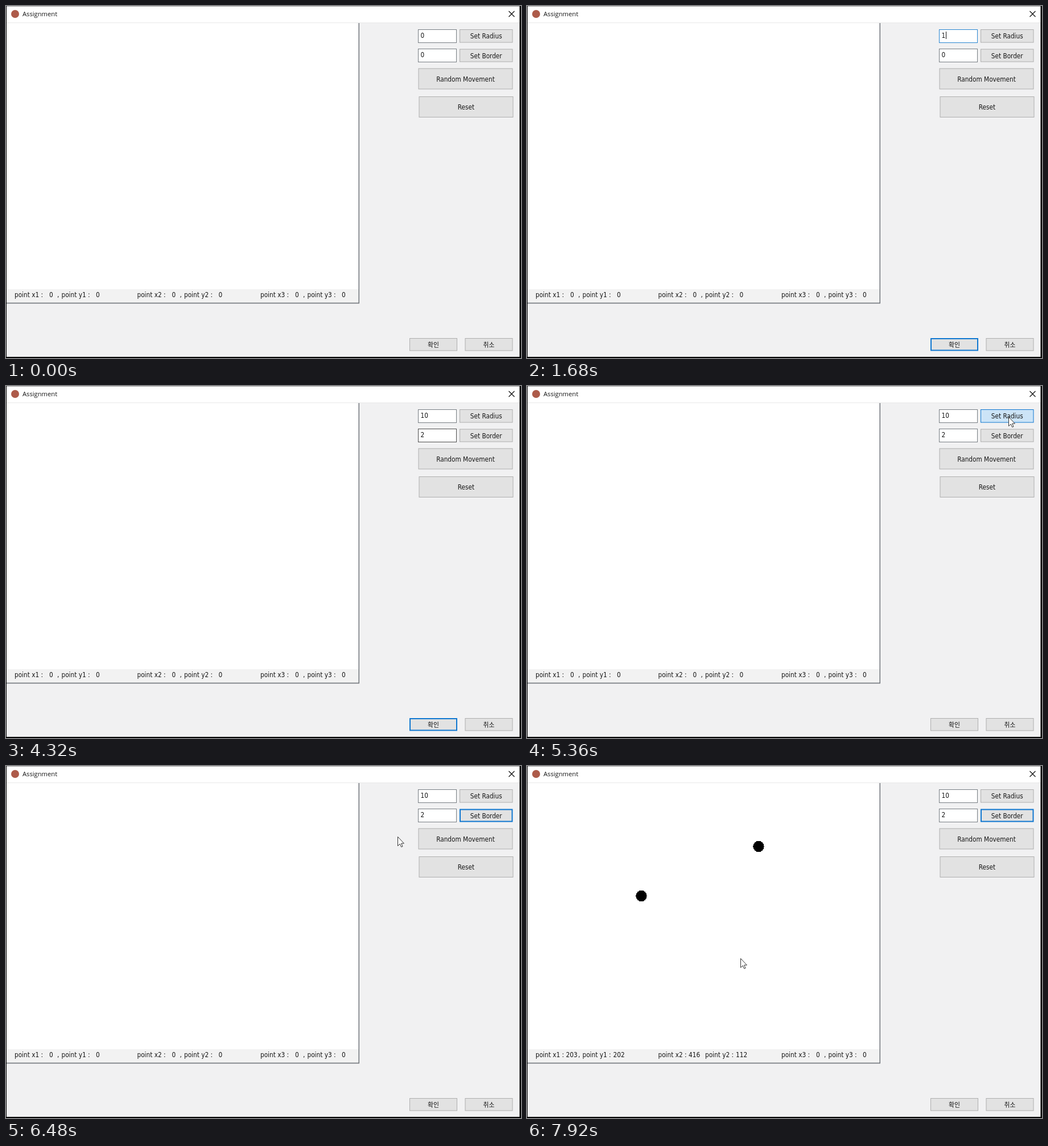
An HTML page that plays this animation: 905x619 px, repeating every 8 s.

```html
<!DOCTYPE html>
<html lang="ko">
<head>
<meta charset="utf-8">
<title>Assignment</title>
<style>
html, body { margin: 0; width: 100%; height: 100%; overflow: hidden; background: #f1f1f2; }
svg { display: block; width: 905px; height: 619px; }
text { font: 11.7px "DejaVu Sans Condensed", Roboto, sans-serif; fill: #161616; white-space: pre; }
.title { font: 11.2px "Open Sans", "Noto Sans", sans-serif; }
.korean { font: 10.8px "Noto Sans CJK KR", "Noto Sans CJK", sans-serif; }
.mid { text-anchor: middle; }
</style>
</head>
<body>
<svg id="stage" viewBox="0 0 905 619" xmlns="http://www.w3.org/2000/svg"></svg>
<script>
const LOOP = 8000, STEP = 80;
const stage = document.getElementById('stage');

function add(tag, attrs, text) {
  const el = document.createElementNS('http://www.w3.org/2000/svg', tag);
  set(el, attrs);
  if (text !== undefined) el.textContent = text;
  return stage.appendChild(el);
}
function set(el, attrs) {
  for (const key in attrs) el.setAttribute(key, attrs[key]);
}
const show = (el, on) => el.setAttribute('visibility', on ? 'visible' : 'hidden');
const rect = (x, y, width, height, fill) => add('rect', { x, y, width, height, fill });
const label = (x, y, text, cls = '') => add('text', { x, y, class: cls }, text);

function button(x, y, w, h, text, cls = '') {
  const box = add('rect', {});
  label(x + w / 2, y + h / 2 + 4.5, text, 'mid ' + cls);
  return state => {
    const inset = state === 'focus' ? 1 : 0.5;
    set(box, {
      x: x + inset, y: y + inset, width: w - 2 * inset, height: h - 2 * inset,
      fill: { hover: '#e5f1fb', pressed: '#cce4f7' }[state] || '#e2e2e2',
      stroke: state ? '#0f77d0' : '#aeaeae',
      'stroke-width': state === 'focus' ? 2 : 1
    });
  };
}

function field(y) {
  const box = add('rect', { x: 724.5, y: y + 0.5, width: 67, height: 23, fill: '#fff' });
  const mark = rect(728, y + 4, 8, 14, '#0078d7');
  const text = label(728.5, y + 15, '0');
  const caret = rect(0, y + 4, 1, 13, '#111');
  return (value, border, selected, blink) => {
    box.setAttribute('stroke', border);
    text.textContent = value;
    text.style.fill = selected ? '#fff' : '';
    show(mark, selected);
    show(caret, blink);
    caret.setAttribute('x', 729 + value.length * 7);
  };
}

// Coordinate readout: zeros are padded, larger values sit next to the colon
function readout(n, x) {
  label(x, 512, `point x${n} :`);
  const comma = label(x + 75, 512, ',');
  label(x + 82.5, 512, `point y${n} :`);
  const px = label(0, 512, '0'), py = label(0, 512, '0');
  return (vx, vy) => {
    px.textContent = vx;
    py.textContent = vy;
    px.setAttribute('x', x + (vx ? 53.5 : 61));
    py.setAttribute('x', x + (vy ? 136.5 : 143));
    show(comma, !(vx && n === 2));
  };
}

// Window
rect(0, 0, 905, 619, '#f1f1f2');
rect(0, 0, 905, 29, '#fff');
rect(0, 29, 905, 1, '#e9e9e9');
rect(1, 30, 619, 468, '#fff');
rect(1, 498, 619, 24, '#f2f2f2');
rect(619.5, 30, 1.5, 493, '#70757b');
rect(1, 521.7, 620, 1.6, '#70757b');
rect(0, 0, 905, 0.6, '#555');
rect(0, 0, 1, 619, '#000');
rect(902.5, 0, 2.5, 619, '#000');
rect(0, 617, 905, 2, '#000');
add('circle', { cx: 16, cy: 14, r: 7, fill: '#ad5b4a' });
label(29, 18, 'Assignment', 'title');
add('path', { d: 'M883.5 9l10 10m0-10l-10 10', stroke: '#111', 'stroke-width': 1.2 });

const radiusField = field(41), borderField = field(75);
const radiusButton = button(797, 41, 93.5, 23.5, 'Set Radius');
const borderButton = button(797, 75.5, 93.5, 23, 'Set Border');
button(724.5, 109.5, 166, 37, 'Random Movement')('');
button(725.5, 159, 166, 37, 'Reset')('');
const okButton = button(709, 584, 84, 22.5, '확인', 'korean');
button(806.5, 584, 84, 22.5, '취소', 'korean')('');

const readouts = [15, 230.5, 447].map((x, i) => readout(i + 1, x));
const dots = [[201, 228.5], [407, 141.5]].map(([cx, cy]) =>
  add('circle', { cx, cy, r: 9.7, fill: '#000', 'shape-rendering': 'crispEdges' }));

const arrow = add('path', {
  d: 'M.5 .5V16.5L4.2 13 6.7 18.4 9 17.4 6.6 12.1H11.4Z',
  fill: '#fff', stroke: '#333', 'stroke-linejoin': 'round'
});
const beam = add('path', {
  d: 'M-3.5-6.5h2.5l1 1 1-1h2.5M0-5.5v11M-3.5 6.5h2.5l1-1 1 1h2.5',
  fill: 'none', stroke: '#222', 'stroke-width': 1.2
});

// Pointer strokes: each is a list of [time, x, y]
const strokes = [
  [[480, 690, 90], [800, 748, 54], [960, 756, 53], [1600, 756, 53]],
  [[2640, 757, 60], [2800, 753, 82], [2880, 753, 85], [3040, 753, 88],
   [3280, 727, 89], [3440, 757, 91], [3840, 757, 91]],
  [[4640, 757, 90], [4800, 757, 90], [5200, 846, 54], [5600, 846, 54],
   [5840, 848, 85], [6240, 848, 85], [6400, 780, 105], [6880, 230, 220],
   [6960, 201, 228], [7120, 201, 228], [7360, 407, 142], [7520, 407, 142],
   [7760, 383, 310], [7920, 375, 338]]
];

function pointerAt(t) {
  const path = strokes.find(s => t >= s[0][0] && t <= s[s.length - 1][0]);
  if (!path) return null;
  const i = Math.max(1, path.findIndex(p => p[0] >= t));
  const [a, b] = [path[i - 1], path[i]];
  const k = (t - a[0]) / (b[0] - a[0]);
  return [a[1] + (b[1] - a[1]) * k, a[2] + (b[2] - a[2]) * k];
}

const within = (v, from, to) => v >= from && v < to;

function render(t) {
  const p = pointerAt(t);
  const inField = p && within(p[0], 724, 792) && (within(p[1], 41, 65) || within(p[1], 75, 99));
  const over = top => p && within(p[0], 797, 891) && within(p[1], top, top + 23);
  show(arrow, p && !inField);
  show(beam, inField);
  if (p) {
    const transform = `translate(${p.map(Math.round)})`;
    set(arrow, { transform });
    set(beam, { transform });
  }

  const radius = t < 1680 ? '0' : t < 1920 ? '1' : '10';
  radiusField(radius, within(t, 1200, 3040) ? '#2a86d1' : '#777d83',
    within(t, 1360, 1680), within(t, 1680, 2240) || within(t, 2480, 2720));
  borderField(t < 4080 ? '0' : '2', within(t, 2800, 4640) ? '#4d4d4d' : '#777d83',
    within(t, 3280, 4080), within(t, 4080, 4320) || within(t, 4640, 4880));

  okButton(within(t, 160, 5360) ? 'focus' : '');
  radiusButton(within(t, 5360, 5440) ? 'pressed' : within(t, 5360, 6240) ? 'focus' : over(41) ? 'hover' : '');
  borderButton(within(t, 6160, 6240) ? 'pressed' : t >= 6240 ? 'focus' : over(75.5) ? 'hover' : '');

  const first = t >= 7040, second = t >= 7440;
  show(dots[0], first);
  show(dots[1], second);
  readouts[0](first ? 203 : 0, first ? 202 : 0);
  readouts[1](second ? 416 : 0, second ? 112 : 0);
  readouts[2](0, 0);
}

const start = performance.now();
function tick() {
  const t = (performance.now() - start) % LOOP;
  render(Math.floor(t / STEP) * STEP);
  requestAnimationFrame(tick);
}
tick();
</script>
</body>
</html>
```
